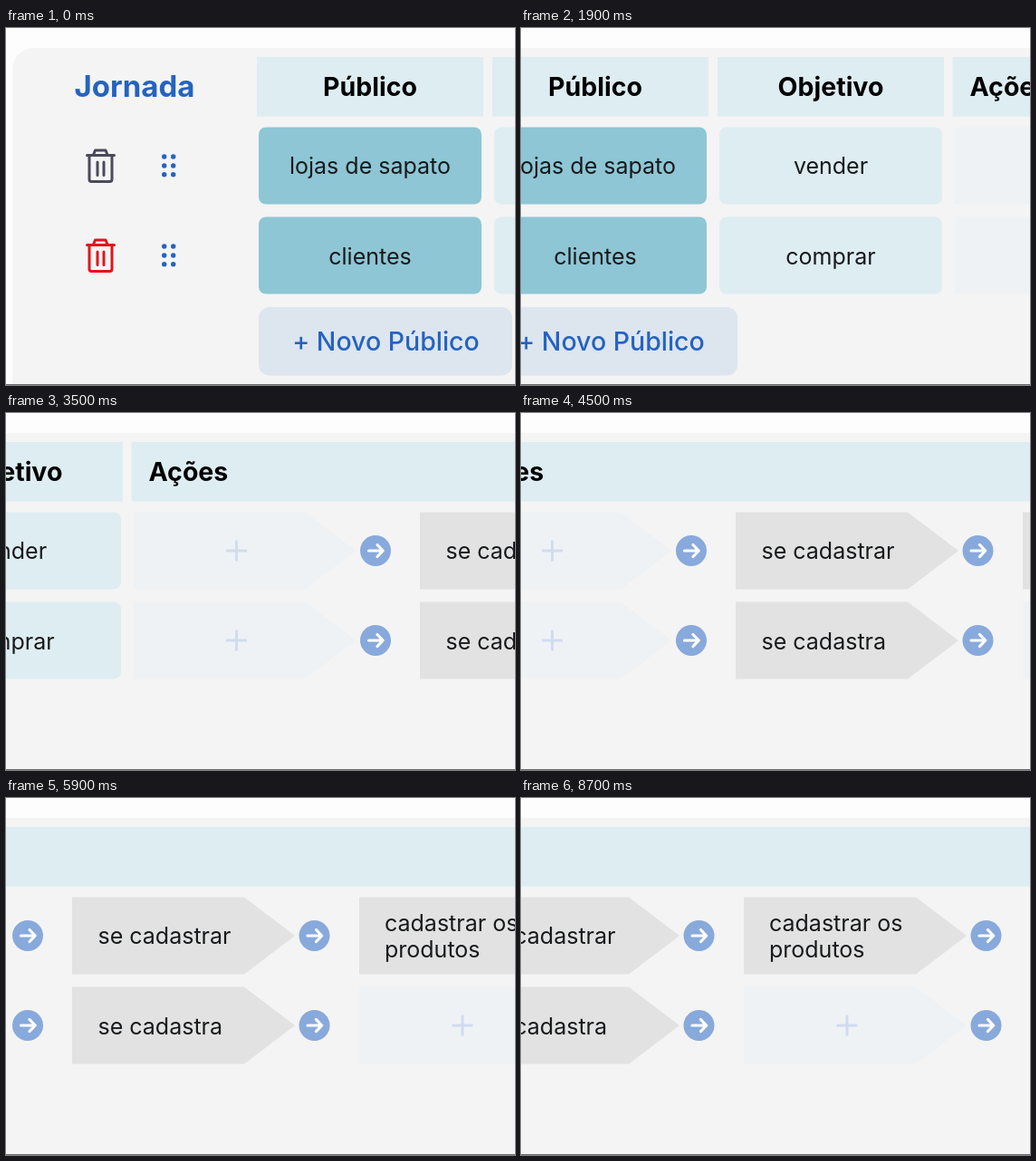
An HTML page that plays this animation: 562x394 px, repeating every 9.3 s.

```html
<!DOCTYPE html>
<html lang="pt">
<head>
<meta charset="utf-8">
<title>Jornada</title>
<style>
  html, body { margin: 0; width: 100%; height: 100%; overflow: hidden; background: #fdfdfd; }
  svg { display: block; width: 562px; height: 394px; font-family: Inter, Roboto, sans-serif; }
  .panel { fill: #f4f4f4; }
  .head, .light { fill: #deedf2; }
  .dark { fill: #8ec6d5; }
  .step { fill: #e2e2e2; }
  .ghost { fill: #eff2f5; }
  .button { fill: #dde5ee; }
  .title { font-size: 33px; font-weight: 700; fill: #2563c0; }
  .label { font-size: 28.5px; font-weight: 700; fill: #000; }
  .add { font-size: 28.5px; font-weight: 500; fill: #2563c0; }
  .cell { font-size: 25px; fill: #17191b; }
  .mid { text-anchor: middle; }
  .dots { fill: #2563c0; }
  .plus { stroke: #d0dcee; stroke-width: 3; }
  .disc { fill: #88a9db; }
  .line { fill: none; stroke-width: 3; stroke-linecap: round; stroke-linejoin: round; }
  .arrow { stroke: #fff; stroke-width: 3.2; }
</style>
</head>
<body>
<svg viewBox="0 0 562 394">
  <defs>
    <g id="trash" class="line">
      <path d="M89.5 140.5H119.5M96.5 140L98.5 135H110L112 140M92 141V167Q92 169.5 94.5 169.5H114.5Q117 169.5 117 167V141M101 148V162.5M108 148V162.5"/>
    </g>
    <g id="dots" class="dots">
      <circle cx="174.7" cy="142" r="2.7"/><circle cx="184.7" cy="142" r="2.7"/>
      <circle cx="174.7" cy="152" r="2.7"/><circle cx="184.7" cy="152" r="2.7"/>
      <circle cx="174.7" cy="161.7" r="2.7"/><circle cx="184.7" cy="161.7" r="2.7"/>
    </g>
    <path id="chevron" d="M0 109.5H190L246 152L190 194.5H0Z"/>
    <path id="plus" class="plus" d="M102.5 152H125.5M114 140.5V163.5"/>
    <g id="next">
      <circle class="disc" cx="267.5" cy="152" r="17"/>
      <path class="line arrow" d="M260 152H275M269.5 145.5L275.7 152L269.5 158.5"/>
    </g>
  </defs>

  <g id="board">
    <rect class="panel" x="7" y="22" width="2000" height="420" rx="24"/>
    <text class="title mid" x="142" y="76">Jornada</text>

    <rect class="head" x="277" y="32" width="250" height="65.5"/>
    <rect class="head" x="537" y="32" width="250" height="65.5"/>
    <rect class="head" x="796.5" y="32" width="1100" height="65.5"/>
    <text class="label mid" x="402" y="75">Público</text>
    <text class="label mid" x="662" y="75">Objetivo</text>
    <text class="label" x="815.5" y="75">Ações</text>

    <g id="row1">
      <use href="#trash" stroke="#4a4a59"/>
      <use href="#dots"/>
      <rect class="dark" x="279" y="109.5" width="246" height="85" rx="8"/>
      <rect class="light" x="539" y="109.5" width="246" height="85" rx="8"/>
      <text class="cell mid" x="402" y="161.3">lojas de sapato</text>
      <text class="cell mid" x="662" y="161.3">vender</text>
      <g transform="translate(798.5)"><use href="#chevron" class="ghost"/><use href="#plus"/><use href="#next"/></g>
      <g transform="translate(1115)">
        <use href="#chevron" class="step"/><use href="#next"/>
        <text class="cell" x="28.5" y="161.3">se cadastrar</text>
      </g>
      <g transform="translate(1432)">
        <use href="#chevron" class="step"/><use href="#next"/>
        <text class="cell" x="28" y="147.3">cadastrar os</text>
        <text class="cell" x="28" y="176.3">produtos</text>
      </g>
    </g>

    <g id="row2" transform="translate(0 99)">
      <use href="#trash" stroke="#e0161d"/>
      <use href="#dots"/>
      <rect class="dark" x="279" y="109.5" width="246" height="85" rx="8"/>
      <rect class="light" x="539" y="109.5" width="246" height="85" rx="8"/>
      <text class="cell mid" x="402" y="161.8">clientes</text>
      <text class="cell mid" x="662" y="161.8">comprar</text>
      <g transform="translate(798.5)"><use href="#chevron" class="ghost"/><use href="#plus"/><use href="#next"/></g>
      <g transform="translate(1115)">
        <use href="#chevron" class="step"/><use href="#next"/>
        <text class="cell" x="28.5" y="161.8">se cadastra</text>
      </g>
      <g transform="translate(1432)"><use href="#chevron" class="ghost"/><use href="#plus"/><use href="#next"/></g>
    </g>

    <rect class="button" x="279" y="308" width="280" height="75.5" rx="12"/>
    <text class="add mid" x="419.5" y="356">+ Novo Público</text>
  </g>
  <rect y="393" width="562" height="1" fill="#6c6c6c"/>
</svg>
<script>
  const LOOP = 9300, STEP = 100;
  // Scroll knots: time (ms), offset (px), speed (px/ms)
  const knots = [
    [0, 0, .06], [900, 120, .18], [1900, 320, .208], [3500, 658, .22], [4500, 878, .19],
    [5900, 1042, .11], [6900, 1180, 0], [7000, 1180, 0], [7500, 1186, 0], [LOOP, 1186, 0]
  ];
  const board = document.getElementById('board');

  // Cubic Hermite between neighbouring knots
  function scrollAt(t) {
    const i = knots.findIndex(k => k[0] > t);
    const [t0, x0, v0] = knots[i - 1], [t1, x1, v1] = knots[i];
    const d = t1 - t0, u = (t - t0) / d, w = 1 - u;
    return x0 * w * w * (1 + 2 * u) + x1 * u * u * (3 - 2 * u) + d * u * w * (v0 * w - v1 * u);
  }

  function draw() {
    const t = Math.floor(performance.now() % LOOP / STEP) * STEP;
    board.setAttribute('transform', `translate(${-Math.round(scrollAt(t))})`);
    requestAnimationFrame(draw);
  }
  draw();
</script>
</body>
</html>
```
